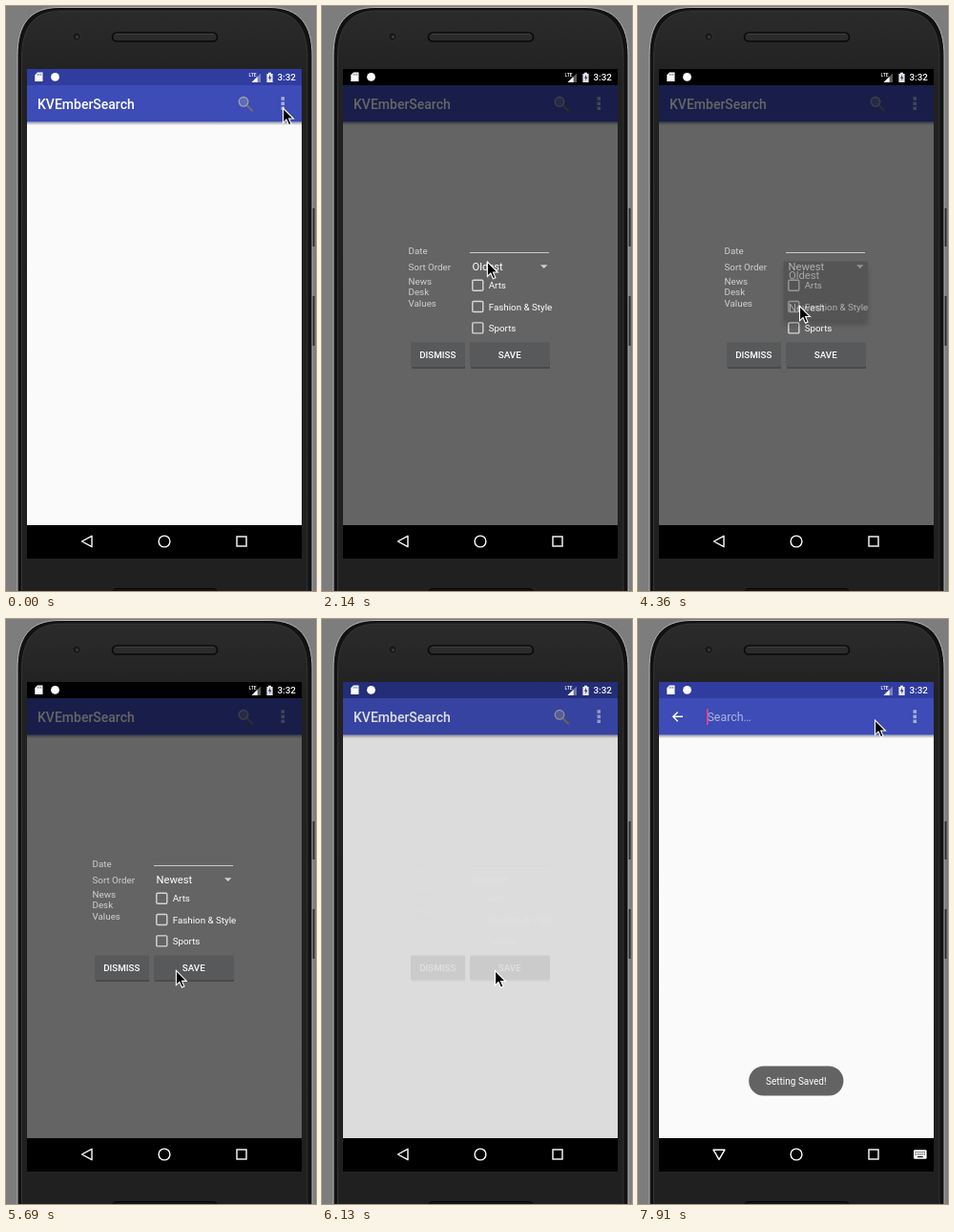
An HTML page for the animation above (8000 ms loop, 325x613 px).

```html
<!DOCTYPE html>
<html lang="en">
<head>
<meta charset="utf-8">
<title>Search settings</title>
<style>
  html, body { margin: 0; width: 100%; height: 100%; overflow: hidden; background: #7d7d7d; }
  svg { display: block; width: 100vw; height: 100vh; }
  text { font-family: Roboto, sans-serif; font-size: 9.8px; fill: #fff; }
  .medium { font-weight: 500; }
  .label { fill: #cfcfcf; }
  .item { font-size: 11.2px; }
  .line { fill: none; stroke: #fff; stroke-width: 1.4; }
</style>
</head>
<body>
<svg viewBox="0 0 325 613" preserveAspectRatio="none">
  <defs>
    <linearGradient id="shade" x2="0" y2="1">
      <stop offset="0" stop-opacity=".38"/>
      <stop offset="1" stop-opacity="0"/>
    </linearGradient>
    <linearGradient id="face" x2="0" y2="1">
      <stop offset="0" stop-color="#2b2b2b"/>
      <stop offset=".12" stop-color="#212121"/>
      <stop offset="1" stop-color="#202020"/>
    </linearGradient>
    <filter id="blur" x="-20%" y="-20%" width="140%" height="160%"><feGaussianBlur stdDeviation="2.5"/></filter>
    <g id="box"><rect x="-5.5" y="-5.5" width="11" height="11" rx="1.2" class="line" style="stroke:#d6d6d6"/></g>
  </defs>

  <!-- phone -->
  <rect width="325" height="613" fill="#7d7d7d"/>
  <path d="M320 212h3.5v40H320zM320 304h3.5v52H320z" fill="#2a2a2a"/>
  <path d="M12 620V52C12 20 24 1.5 56 1.5H276C308 1.5 321 20 321 52V620Z" fill="#121212" stroke="#b4b4b4" stroke-width="1"/>
  <path d="M16.5 620V54C16.5 24 28 5 58 5H274C304 5 316 24 316 54V620Z" fill="url(#face)" stroke="#3c3c3c" stroke-width=".8"/>
  <circle cx="74" cy="32" r="4.3" fill="#191919" stroke="#343434" stroke-width=".8"/>
  <circle cx="74.5" cy="32.5" r="1.4" fill="#3f3f3f"/>
  <rect x="111.5" y="28" width="110" height="9" rx="4.5" fill="#2b2b2b" stroke="#080808" stroke-width="1.6"/>
  <path d="M115 29.3H218" stroke="#4a4a4a" stroke-width=".8"/>
  <rect x="111.5" y="610.5" width="110" height="9" rx="4.5" fill="#151515" stroke="#050505"/>

  <!-- app -->
  <rect x="22" y="66" width="288" height="513" fill="#000"/>
  <rect x="22" y="83" width="288" height="461" fill="#fafafa"/>
  <rect x="22" y="121.5" width="288" height="3.5" fill="url(#shade)"/>
  <rect x="22" y="83" width="288" height="38.5" fill="#3d4cb6"/>
  <g id="title">
    <text x="33" y="107.5" class="medium" style="font-size:14px">KVEmberSearch</text>
    <path d="M253 104.5L258 109.5" stroke="#6d6d72" stroke-width="2.4" stroke-linecap="round"/>
    <circle cx="249" cy="100.3" r="4.8" fill="#8088b8" fill-opacity=".5" stroke="#a3a3a8" stroke-width="1.3"/>
  </g>
  <g id="search">
    <path d="M47 102.3H37M41.7 97.4L36.8 102.3L41.7 107.2" class="line"/>
    <text x="72.5" y="106.8" style="font-size:12.4px;fill:#aeb4df">Search…</text>
    <rect id="caret" x="72" y="94" width="1.5" height="17" fill="#ff4081"/>
  </g>
  <path d="M288.5 95.2h3.5v3.5h-3.5zM288.5 100.4h3.5v3.5h-3.5zM288.5 105.6h3.5v3.5h-3.5z" fill="#a8addb"/>
  <rect id="dim" x="22" y="83" width="288" height="461"/>

  <!-- status bar -->
  <rect id="status" x="22" y="66" width="288" height="17" fill="#303c9f"/>
  <path d="M33 69.5H38.5V79H30.3V72.3Z" fill="#fff"/>
  <path d="M33.2 70.8v2M35 70.8v2M36.8 70.8v2" stroke="#444b80" stroke-width=".7"/>
  <circle cx="51.5" cy="74.4" r="4.4" fill="#fff"/>
  <text x="254.5" y="74" class="medium" style="font-size:5px">LTE</text>
  <path d="M257.5 80L267 70.5V80Z" fill="#fff" fill-opacity=".35"/>
  <path d="M257.5 80L263.6 73.9V80Z" fill="#fff"/>
  <path d="M275 69.8h3v1.2h1.6v9h-6.2v-9h1.6z" fill="#fff" fill-opacity=".9"/>
  <path d="M277 71.8l-2 4h1.4v2.8l2-4H277z" fill="#343b70"/>
  <text x="284.5" y="78.3" class="medium">3:32</text>

  <!-- settings dialog -->
  <g id="dialog">
    <text x="90.5" y="259.7" class="label">Date</text>
    <text x="90.5" y="277.3" class="label">Sort Order</text>
    <text x="90.5" y="291.7" class="label">News</text>
    <text x="90.5" y="303.2" class="label">Desk</text>
    <text x="90.5" y="314.6" class="label">Values</text>
    <path d="M155 258.5H238" stroke="#c9c9c9"/>
    <text id="order" x="157.5" y="277.2" class="item"></text>
    <path d="M229 271.3H236.4L232.7 275Z" fill="#d0d0d0"/>
    <use href="#box" x="163.3" y="292.7"/>
    <use href="#box" x="163.3" y="315"/>
    <use href="#box" x="163.3" y="337.4"/>
    <text x="174.7" y="296.4">Arts</text>
    <text x="174.7" y="318.7">Fashion &amp; Style</text>
    <text x="174.7" y="341.1">Sports</text>
    <path d="M94 354H150V380H94ZM156 354H239V380H156Z" opacity=".28"/>
    <rect x="93" y="352.5" width="57" height="25.8" rx="1.4" fill="#58595b"/>
    <rect id="save" x="155" y="352.5" width="84" height="25.8" rx="1.4" fill="#58595b"/>
    <text x="121.3" y="369.2" class="medium" text-anchor="middle">DISMISS</text>
    <text x="196.7" y="369.2" class="medium" text-anchor="middle">SAVE</text>
  </g>

  <!-- drop-down -->
  <g id="popup">
    <rect x="153" y="269" width="88" height="62" opacity=".4" filter="url(#blur)"/>
    <rect x="152.5" y="264" width="88.5" height="61" rx="1.4" fill="#424242"/>
    <rect id="press" x="152.5" y="295" width="88.5" height="30" fill="#fff" fill-opacity=".16"/>
    <text x="158" y="282.2" class="item">Oldest</text>
    <text x="158" y="316" class="item">Newest</text>
  </g>

  <g id="toast">
    <rect x="116.2" y="468.5" width="99.2" height="31" rx="15.5" fill="#636363"/>
    <text x="165.8" y="488" text-anchor="middle" style="font-size:10px">Setting Saved!</text>
  </g>

  <!-- navigation -->
  <path id="back" class="line" stroke-linejoin="round"/>
  <circle cx="166" cy="561" r="5.9" class="line"/>
  <rect x="242" y="556" width="10" height="10" class="line"/>
  <g id="keys">
    <rect x="289" y="556.3" width="13.6" height="9.4" rx="1.2" fill="#fff"/>
    <path d="M290.8 558.8H301M290.8 561H301" stroke="#000" stroke-width="1.1" stroke-dasharray="1.2 1"/>
    <path d="M293 563.6H298.8" stroke="#000" stroke-width="1.1"/>
  </g>

  <path id="cursor" d="M.5 .5V15.8L4 12.5L6.5 18.2L9 17.1L6.6 11.5H11.4Z" fill="#000" stroke="#fff" stroke-width="1.1"/>
</svg>
<script>
const LOOP = 8000, TICK = 148.3;
const el = id => document.getElementById(id);
const clamp = (v, lo, hi) => Math.min(hi, Math.max(lo, v));
const ease = p => p * p * (3 - 2 * p);
const fade = (id, a) => el(id).setAttribute('opacity', a);

// Screen updates passed since `start`, from 0 to `n`.
const ticks = (t, start, n) => clamp(Math.floor((t - start) / TICK + 0.01) + 1, 0, n);

// Cursor moves: start time, update count, destination.
const moves = [
  [1400, 7, 166, 277],
  [3330, 5, 169, 314],
  [4800, 3, 169, 367.5],
  [5400, 3, 181, 368],
  [6430, 5, 250, 109],
  [7170, 3, 248, 105.5]
];

function cursorAt(t) {
  let x = 290, y = 106.5;
  for (const [start, n, tx, ty] of moves) {
    const p = ease(ticks(t, start, n) / n);
    x += (tx - x) * p;
    y += (ty - y) * p;
  }
  return [x, y];
}

function draw(t) {
  const open = ticks(t, 800, 2), close = ticks(t, 5980, 3);
  const shown = close ? [0.6, 0.12, 0][close - 1] : [0, 0.45, 1][open];
  fade('dialog', shown);
  fade('dim', close ? [0.49, 0.12, 0][close - 1] : [0, 0.3, 0.6][open]);
  fade('status', t < 500 ? 1 : [0, 0.12, 0.75, 1][close]);

  const drop = ticks(t, 3030, 2), pick = ticks(t, 4210, 3);
  fade('popup', pick ? [1, 0.42, 0][pick - 1] : [0, 0.5, 1][drop]);
  el('popup').setAttribute('transform', `translate(0 ${pick > 1 ? 3.5 : 0})`);
  fade('press', pick === 1 ? 1 : 0);
  el('order').textContent = pick > 1 ? 'Newest' : 'Oldest';

  fade('toast', [0, 0, 0, 0.73, 1][ticks(t, 5980, 4)]);

  const find = ticks(t, 7760, 2);
  fade('title', find ? 0 : 1);
  fade('search', find ? 1 : 0);
  fade('caret', find > 1 ? 1 : 0);
  fade('keys', find > 1 ? 1 : 0);
  el('back').setAttribute('d', find > 1 ? 'M79 556.2H91L85 566.4Z' : 'M79.5 561L90 555.3V566.7Z');

  el('cursor').setAttribute('transform', `translate(${cursorAt(t)})`);
}

const begin = performance.now();
function frame() {
  draw((performance.now() - begin) % LOOP);
  requestAnimationFrame(frame);
}
draw(0);
requestAnimationFrame(frame);
</script>
</body>
</html>
```
